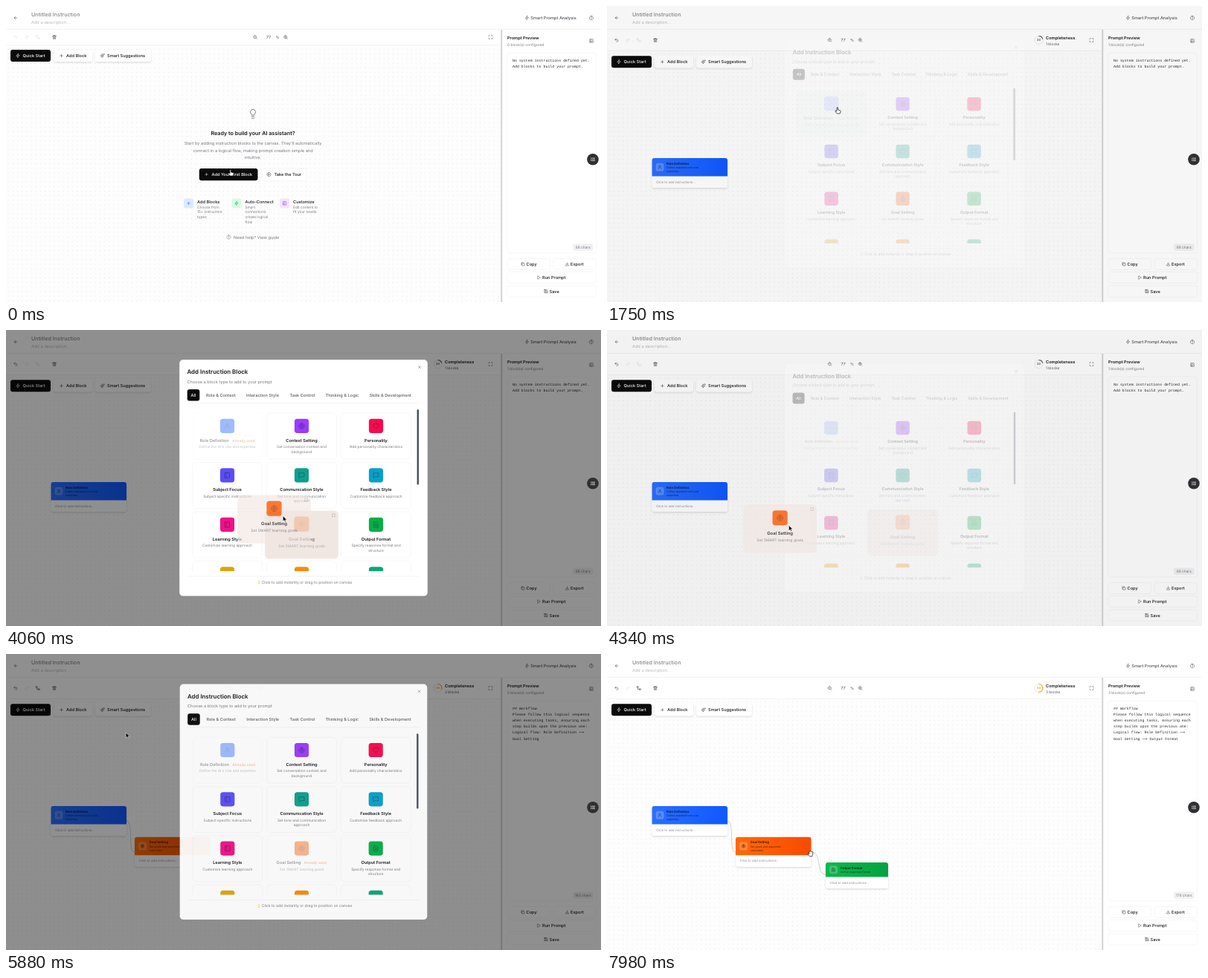
Recreate the animation shown at these times as an HTML page. Size 800 by 399 pixels, loop 8 s.

```html
<!DOCTYPE html>
<html lang="en">
<head>
<meta charset="utf-8">
<title>Prompt builder</title>
<style>
  html, body { margin: 0; width: 100%; height: 100%; overflow: hidden; background: #fff; }
  svg { display: block; width: 100vw; height: 100vh; }
  text { font-family: Inter, sans-serif; text-rendering: geometricPrecision; }
  text.mono { font-family: "Liberation Mono", "DejaVu Sans", monospace; white-space: pre; }
</style>
</head>
<body>
<svg viewBox="0 0 800 399">
  <defs>
    <pattern id="dots" width="6.16" height="6.16" patternUnits="userSpaceOnUse"><circle cx="3" cy="3" r=".45" fill="#d8d8dc"/></pattern>
    <filter id="soft" x="-20%" y="-40%" width="140%" height="200%"><feDropShadow dx="0" dy="1.4" stdDeviation="1.2" flood-opacity=".13"/></filter>
    <clipPath id="list"><rect x="240" y="104" width="320" height="221"/></clipPath>
  </defs>
  <g id="page"></g>
  <rect id="dim" width="800" height="399"/>
  <g id="dialog"></g>
  <g id="ghost" opacity=".82"></g>
  <g id="widget"></g>
  <g id="cursor"></g>
</svg>
<script>
const LOOP = 8000, DIALOG_FADE = 200, DIM_FADE = 150, DIM = .44;
const $ = id => document.getElementById(id);

const ICONS = {
  back: 'M19 12H5m7 7-7-7 7-7',
  zap: 'M13 2 4 14h7l-1 8 10-12h-7z',
  help: 'M12 2a10 10 0 1 0 .01 0M9 9a3 3 0 1 1 4 3c-1 .5-1 1-1 2m0 3v.2',
  undo: 'M9 14 4 9l5-5M4 9h10a5 5 0 0 1 0 11h-3',
  redo: 'm15 14 5-5-5-5m5 5H10a5 5 0 0 0 0 11h3',
  flow: 'M3 3h6v6H3zM15 15h6v6h-6zM6 9v9h9',
  trash: 'M3 6h18M8 6V3h8v3M5 6l1 15h12l1-15M10 11v6m4-6v6',
  zoomOut: 'M11 3a8 8 0 1 0 .01 0M17 17l4 4M8 11h6',
  zoomIn: 'M11 3a8 8 0 1 0 .01 0M17 17l4 4M8 11h6m-3-3v6',
  expand: 'M8 3H3v5m13-5h5v5M8 21H3v-5m13 5h5v-5',
  plus: 'M5 12h14M12 5v14',
  spark: 'M11 4l2 7 7 2-7 2-2 7-2-7-7-2 7-2zM20 2v5m-2.5-2.5h5',
  bulb: 'M9 18h6m-5 4h4M15 14c.2-1 .7-1.7 1.5-2.5a6 6 0 1 0-9 0C8.3 12.3 8.8 13 9 14z',
  playCircle: 'M12 2a10 10 0 1 0 .01 0M10 8l6 4-6 4z',
  edit: 'M12 3H4v17h17v-8M18 2l4 4L12 16l-5 1 1-5z',
  copy: 'M8 8h13v13H8zM4 16H3V3h13v1',
  download: 'M12 3v12m-5-5 5 5 5-5M3 16v5h18v-5',
  play: 'M6 3l14 9-14 9z',
  save: 'M4 3h13l4 4v14H3V3zM7 21v-8h10v8M7 3v5h8',
  user: 'M12 3a4 4 0 1 0 .01 0M4 21a8 8 0 0 1 16 0',
  target: 'M12 2a10 10 0 1 0 .01 0M12 6a6 6 0 1 0 .01 0M12 10a2 2 0 1 0 .01 0',
  heart: 'M12 21 3 12a5 5 0 0 1 9-6 5 5 0 0 1 9 6z',
  book: 'M4 3h16v18H4zM8 3v18',
  chat: 'M3 4h18v13H9l-5 4z',
  file: 'M5 2h9l5 5v15H5zM9 12h6m-6 4h6M9 8h2',
  sliders: 'M10 6h11M10 12h11M10 18h11M3 6h3M3 12h3M3 18h3',
  close: 'M6 6l12 12M18 6 6 18'
};

// y is the optical centre of the text line
const text = (x, y, str, size = 5.65, fill = '#18181b', weight = 400, more = '') =>
  `<text x="${x}" y="${y + size * .36}" font-size="${size}" fill="${fill}" font-weight="${weight}" ${more}>${str}</text>`;
const mid = (x, y, str, size, fill, weight) => text(x, y, str, size, fill, weight, 'text-anchor="middle"');
const box = (x, y, w, h, fill, r = 3, more = '') =>
  `<rect x="${x}" y="${y}" width="${w}" height="${h}" rx="${r}" fill="${fill}" ${more}/>`;
const icon = (name, x, y, size = 6.3, color = '#333336', width = 1.9) =>
  `<path d="${ICONS[name]}" transform="translate(${x - size / 2} ${y - size / 2}) scale(${size / 24})" fill="none" stroke="${color}" stroke-width="${width}" stroke-linecap="round" stroke-linejoin="round"/>`;
const line = (d, color = '#ebebee', width = .6) => `<path d="${d}" fill="none" stroke="${color}" stroke-width="${width}"/>`;
const outline = 'stroke="#f1f1f3" stroke-width=".6"';
const lines = (x, y, step, list, draw) => list.map((s, i) => draw(x, y + i * step, s)).join('');

const GREY = '#7a7a82';

const CARDS = [
  ['Role Definition', ['Define the AI\'s role and expertise'], '#2b6bff', 'user'],
  ['Context Setting', ['Set conversation context and', 'background'], '#9a3cfb', 'target'],
  ['Personality', ['Add personality characteristics'], '#f60b4f', 'heart'],
  ['Subject Focus', ['Subject specific instructions'], '#5a4ef6', 'book'],
  ['Communication Style', ['Set tone and communication', 'approach'], '#0d9f8e', 'chat'],
  ['Feedback Style', ['Customize feedback approach'], '#09a0c8', 'chat'],
  ['Learning Style', ['Customize learning approach'], '#ee1288', 'book'],
  ['Goal Setting', ['Set SMART learning goals'], '#f95b06', 'target'],
  ['Output Format', ['Specify response format and', 'structure'], '#08ae48', 'file'],
  ['', [], '#dea406', 'book'], ['', [], '#f98b06', 'zap'], ['', [], '#08a870', 'chat']
];
const cardCentre = i => [297.5 + i % 3 * 100, 143 + Math.floor(i / 3) * 66.5];

function card(i, used, hovered, alpha = 1, backing = 1) {
  const [title, desc, color, glyph] = CARDS[i];
  const [x, y] = cardCentre(i);
  const name = used
    ? text(x - (i ? 34 : 37), y + 5.5, title, 5.65, '#18181b', 500) + text(x + (i ? 3 : 6.5), y + 5.8, 'Already used', 4.9, '#f97316', 500)
    : mid(x, y + 5.5, title, 5.65, '#18181b', 600);
  const back = hovered
    ? box(x - 47, y - 31, 94, 62, '#efefef', 5, `fill-opacity="${backing}"`) + box(x - 47, y - 31, 94, 62, color, 5, 'fill-opacity=".05"') +
      icon('expand', x + 41, y - 25, 4.5, GREY)
    : box(x - 47, y - 31, 94, 62, '#fff', 5, outline);
  return `<g opacity="${used ? .45 : 1}" transform="translate(${x} ${y}) scale(${hovered ? 1.05 : 1}) translate(${-x} ${-y})">${back}
    <g opacity="${alpha}">${box(x - 9.6, y - 23.3, 19.2, 19.2, color, 3.6)}${icon(glyph, x, y - 13.7, 9, 'rgba(0,0,0,.42)', 1.7)}
    ${name}${lines(x, y + 14.5, 6.5, desc, (a, b, s) => mid(a, b, s, 4.85, GREY))}</g></g>`;
}

function dialog(count, hover, alpha) {
  const usedCards = [0, 7, 8].slice(0, count);
  const tabs = [[269, 'Role &amp; Context'], [323, 'Interaction Style'], [381.5, 'Task Control'], [429.5, 'Thinking &amp; Logic'], [488.5, 'Skills &amp; Development']];
  return box(233.2, 40, 333.6, 318.6, '#fff', 5) +
    text(243.5, 56.5, 'Add Instruction Block', 7.9, '#18181b', 600) +
    text(243.5, 69.5, 'Choose a block type to add to your prompt', 5.65, GREY) +
    icon('close', 556, 50, 6, '#52525b') +
    box(243.7, 80, 16.6, 15.5, '#0a0a0a', 3) + mid(252, 88, 'All', 5.65, '#fff', 500) +
    tabs.map(([x, s]) => text(x, 88, s, 5.65, '#5c5c64', 500)).join('') +
    line('M244 98.5H556M244 332H556') +
    `<g clip-path="url(#list)">${CARDS.map((_, i) => card(i, usedCards.includes(i), i === hover, i === hover ? alpha : 1)).join('')}</g>` +
    box(552.6, 107, 2.4, 101.5, '#475060', 1.2) +
    icon('bulb', 340, 340, 5, '#eab308') + text(343.5, 340, 'Click to add instantly or drag to position on canvas', 5.1, GREY);
}

const BLOCKS = [
  [60.5, 205, 101.5, 40, 24.5, '#2b6fff', '#0f58ff', 'Role Definition', ['Define assistant role and', 'expertise'], 'user'],
  [173, 246.7, 101.5, 40, 24.5, '#ff6a0a', '#f84a00', 'Goal Setting', ['Set goals and expected', 'outcomes'], 'target'],
  [294, 281, 84, 35, 19.5, '#0bb84e', '#06a240', 'Output Format', ['Define response format'], 'file']
];
function block([x, y, w, h, head, c1, c2, title, desc, glyph], i) {
  const cy = y + head / 2;
  return `<linearGradient id="head${i}"><stop stop-color="${c1}"/><stop offset="1" stop-color="${c2}"/></linearGradient>` +
    box(x, y, w, h, '#fff', 3, 'filter="url(#soft)"') +
    `<path d="M${x} ${y + head}v${3 - head}q0-3 3-3h${w - 6}q3 0 3 3v${head - 3}z" fill="url(#head${i})"/>` +
    box(x + 5.5, cy - 5, 10, 10, 'rgba(255,255,255,.2)', 2, 'stroke="#fff" stroke-opacity=".35" stroke-width=".4"') +
    icon(glyph, x + 10.5, cy, 5.5, 'rgba(0,0,0,.7)') +
    text(x + 19.5, y + 7, title, 4.3, 'rgba(0,0,0,.8)', 600) +
    lines(x + 19.5, y + 12.8, 5.2, desc, (a, b, s) => text(a, b, s, 3.7, 'rgba(0,0,0,.6)')) +
    text(x + 5.5, (y + head + y + h) / 2, 'Click to add instructions...', 4.3, '#8e8e96', 400, 'font-style="italic"');
}

function emptyState() {
  const features = [
    [239, 'plus', '#dbeafe', '#2563eb', 'Add Blocks', ['Choose from', '15+ instruction', 'types']],
    [303.5, 'zap', '#d6fbe3', '#16a34a', 'Auto-Connect', ['Smart', 'connections', 'create logical', 'flow']],
    [368, 'edit', '#f3e3ff', '#9333ea', 'Customize', ['Edit content to', 'fit your needs']]
  ];
  return icon('bulb', 332, 145.5, 14, GREY, 1.6) +
    mid(332, 171, 'Ready to build your AI assistant?', 7.2, '#18181b', 600) +
    lines(332, 185, 9.7, ['Start by adding instruction blocks to the canvas. They\'ll automatically', 'connect in a logical flow, making prompt creation simple and', 'intuitive.'],
      (x, y, s) => mid(x, y, s, 5.65, GREY)) +
    box(259.8, 219, 78.7, 16.2, '#0a0a0a') + icon('plus', 269.5, 227, 6, '#fff') + text(276.5, 227, 'Add Your First Block', 5.65, '#fff', 500) +
    box(343.5, 219, 60.5, 16.2, '#fff', 3, outline) + icon('playCircle', 353.5, 227) + text(360.5, 227, 'Take the Tour', 5.65, '#18181b', 500) +
    features.map(([x, glyph, bg, fg, title, desc]) =>
      box(x, 259.5, 13, 13, bg) + icon(glyph, x + 6.5, 266, 6.5, fg) + text(x + 18, 263.5, title, 5.65, '#18181b', 500) +
      lines(x + 18, 271, 6.6, desc, (a, b, s) => text(a, b, s, 4.85, GREY))).join('') +
    icon('help', 299.5, 311.5, 6.5, GREY) + text(306, 311.5, 'Need help? View guide', 5.65, GREY);
}

function completeness(count) {
  const percent = [0, 20, 30, 50][count], r = 5.5, around = 2 * Math.PI * r;
  const color = count > 1 ? '#f59e0b' : '#52525b';
  return `<circle cx="580.5" cy="46" r="${r}" fill="none" stroke="#e8e8ea" stroke-width="1"/>
    <circle cx="580.5" cy="46" r="${r}" fill="none" stroke="${color}" stroke-width="1.1" stroke-dasharray="${around * percent / 100} 99" transform="rotate(-90 580.5 46)"/>` +
    mid(580.5, 46, percent, 4, color, 600) +
    text(590, 43, 'Completeness', 5.65, '#18181b', 600) + text(590, 51, count + ' blocks', 4.85, '#52525b');
}

function sidebar(count) {
  const flow = ['## Workflow', 'Please follow this logical sequence', 'when executing tasks, ensuring each', 'step builds upon the previous one:',
    'Logical flow: Role Definition ⟶', count > 2 ? 'Goal Setting ⟶ Output Format' : 'Goal Setting'];
  const preview = count > 1 ? flow : ['No system instructions defined yet.', 'Add blocks to build your prompt.'];
  const button = (x, y, w, glyph, gx, label) =>
    box(x, y - 7.5, w, 15, '#fff', 3, outline) + icon(glyph, gx, y, 5.6) + text(gx + 4.5, y, label, 5.65, '#18181b', 500);
  return box(667, 32, 133, 367, '#fff', 0) + box(665.4, 32, 1.8, 367, '#cfcfd2', 0) +
    text(674, 43, 'Prompt Preview', 5.6, '#18181b', 600) + text(674, 52, count + ' block(s) configured', 4.85, GREY) +
    icon('edit', 787, 47) + box(674, 63, 119.5, 270, '#fff', 4, outline) +
    lines(681, 73, 8.15, preview, (x, y, s) => text(x, y, s, 4.95, '#27272a', 400, 'class="mono"')) +
    box(762, 320.5, 27.5, 9.5, '#f1f1f3', 2.5) + mid(775.7, 325.2, [68, 68, 163, 179][count] + ' chars', 4.85, GREY) +
    button(674, 348, 57.5, 'copy', 695, 'Copy') + button(736, 348, 57.5, 'download', 754.5, 'Export') +
    button(674, 366, 119.5, 'play', 716.5, 'Run Prompt') + button(674, 384.5, 119.5, 'save', 726, 'Save');
}

function page(count) {
  const bar = count ? 46 : 42, y = count ? 75.3 : 67, zoom = count ? -35.5 : 0, off = '#dcdce0';
  return box(0, 0, 800, 399, '#fff', 0) + box(0, bar + 11, 666, 399, '#fdfdfd', 0) + box(0, bar + 11, 666, 399, 'url(#dots)', 0) +
    box(0, 32, 666, bar - 18, '#fff', 0) + line(`M0 31.5H800M0 ${count ? 60.5 : 53}H666`) +
    icon('back', 13, 16) + text(34, 11, 'Untitled Instruction', 7.2, '#85858c', 500) + text(34, 22, 'Add a description...', 5.65, '#b9b9c0') +
    icon('zap', 700.5, 16, 6.5, '#52525b') + text(705.3, 16, 'Smart Prompt Analysis', 5.65, '#52525b', 500) + icon('help', 787, 16, 6.5, '#52525b') +
    icon('undo', 13, bar, 6.3, count ? '#333336' : off) + icon('redo', 28, bar, 6.3, off) + icon('flow', 43, bar, 6.3, count > 1 ? '#333336' : off) + icon('trash', 65, bar) +
    icon('zoomOut', 335 + zoom, bar) + mid(353 + zoom, bar, '77', 5.65, '#52525b') + mid(365 + zoom, bar, '%', 5.2, '#52525b') + icon('zoomIn', 376 + zoom, bar) +
    icon('expand', 651.5, bar, 6.3, '#52525b') + (count ? completeness(count) : '') +
    box(6, y - 8, 54, 16, '#0a0a0a') + icon('zap', 16, y, 6.5, '#fff') + text(22.5, y, 'Quick Start', 5.65, '#fff', 500) +
    box(64, y - 8, 52, 16, '#fff', 3, 'filter="url(#soft)"') + icon('plus', 74.5, y) + text(81, y, 'Add Block', 5.65, '#18181b', 500) +
    box(120, y - 8, 75, 16, '#fff', 3, 'filter="url(#soft)"') + icon('spark', 129.5, y) + text(136, y, 'Smart Suggestions', 5.65, '#18181b', 500) +
    (count ? '' : emptyState()) +
    (count > 1 ? line('M162 225C172 225 163 267 173 267', '#b4b4ba') : '') +
    (count > 2 ? line('M274.5 267C290 267 280 297 294 297', '#b4b4ba') : '') +
    BLOCKS.slice(0, count).map(block).join('') + sidebar(count);
}

const POINTERS = {
  arrow: '<path d="M-1.6-3.2v7l1.7-1.5 1 2.4 1.2-.5-1-2.3h2.2z" fill="#000" stroke="#fff" stroke-width=".5"/>',
  point: '<path d="M-1-4q.8-.8 1.5 0v3l3 .8q.8.3.6 1.2l-.8 3h-4l-2.5-3q0-1 1-.9l1.2.8z" fill="#fff" stroke="#111" stroke-width=".7"/>',
  grab: '<path d="M-2.4-2.4q.7-1 1.3-.2.5-1.2 1.3 0 .8-.9 1.3.1 1-.6 1.2.4v3.4l-1 2.5h-3.4l-2.3-3q0-1 1-.9l.8.7z" fill="#fff" stroke="#111" stroke-width=".7"/>'
};

// time, x, y, pointer used from then on
const PATH = [
  [0, 302, 225, 'point'], [630, 302, 225, 'arrow'], [1250, 308, 140, 'point'], [1450, 310, 141, 'point'], [1850, 310, 141, 'grab'],
  [2480, 92, 76, 'point'], [2700, 92, 76, 'arrow'], [2870, 228, 136, 'arrow'], [3400, 411, 275, 'point'], [3850, 411, 275, 'arrow'],
  [4060, 374, 254, 'arrow'], [4500, 192, 272, 'arrow'], [4600, 192, 272, 'grab'], [5320, 135, 90, 'grab'], [5520, 95, 77, 'point'],
  [5720, 95, 77, 'arrow'], [6350, 512, 275, 'point'], [6480, 512, 275, 'arrow'], [6720, 428, 224, 'arrow'], [7100, 306, 290, 'arrow'],
  [7300, 300, 288, 'grab'], [7600, 218, 262, 'grab'], [7950, 274, 269, 'grab'], [LOOP, 274, 269, 'grab']
];
const OPEN = [[630, 1650], [2740, 4250], [5740, 6950]];
const ADDED = [1600, 4550, 7150];
const HOVERS = [[1200, 1900, 0], [3300, 4550, 7], [6300, 7150, 8]];
const DRAGS = [
  { from: 3850, to: 4550, card: 7, grab: [411, 275], alpha: .55 },
  { from: 6480, to: 7150, card: 8, grab: [512, 275], alpha: 1 }
];

const clamp = v => Math.min(1, Math.max(0, v));
const easeOut = v => 1 - (1 - clamp(v)) ** 2.3;
const smooth = v => v * v * (3 - 2 * v);

function pointerAt(t) {
  const i = Math.max(1, PATH.findIndex(k => k[0] > t));
  const [t0, x0, y0, kind] = PATH[i - 1], [t1, x1, y1] = PATH[i];
  const k = smooth((t - t0) / (t1 - t0));
  return [x0 + (x1 - x0) * k, y0 + (y1 - y0) * k, kind];
}

const openness = (t, fade) =>
  Math.max(...OPEN.map(([a, b]) => Math.min(easeOut((t - a) / fade), 1 - easeOut((t - b) / fade))));

// Rebuild a group only when its content changes
const shown = {};
function fill(id, key, build) {
  if (shown[id] === key) return;
  shown[id] = key;
  $(id).innerHTML = build();
}

function draw(t) {
  const count = ADDED.filter(a => t >= a).length;
  const open = openness(t, DIALOG_FADE);
  const hover = (HOVERS.find(([a, b]) => t >= a && t < b) || [0, 0, -1])[2];
  const drag = DRAGS.find(d => t >= d.from && t < d.to);
  const alpha = drag ? drag.alpha : 1;
  const [x, y, kind] = pointerAt(t);

  fill('page', count, () => page(count));
  fill('dialog', [count, hover, alpha].join(), () => dialog(count, hover, alpha));
  $('dim').setAttribute('fill-opacity', DIM * openness(t, DIM_FADE));
  $('dialog').setAttribute('opacity', open);
  $('dialog').setAttribute('transform', `translate(400 199.5) scale(${.95 + .05 * open}) translate(-400 -199.5)`);

  fill('ghost', drag ? drag.card : -1, () => drag ? card(drag.card, false, true, 1, .75) : '');
  if (drag) $('ghost').setAttribute('transform', `translate(${x - drag.grab[0]} ${y - drag.grab[1]})`);

  fill('cursor', kind, () => POINTERS[kind]);
  $('cursor').setAttribute('transform', `translate(${x} ${y})`);
}

$('widget').innerHTML = '<circle cx="789" cy="206.8" r="7.8" fill="#303033"/>' + icon('sliders', 789, 206.8, 7, '#fff', 2.2);

function tick() {
  draw(performance.now() % LOOP);
  requestAnimationFrame(tick);
}
tick();
</script>
</body>
</html>
```
